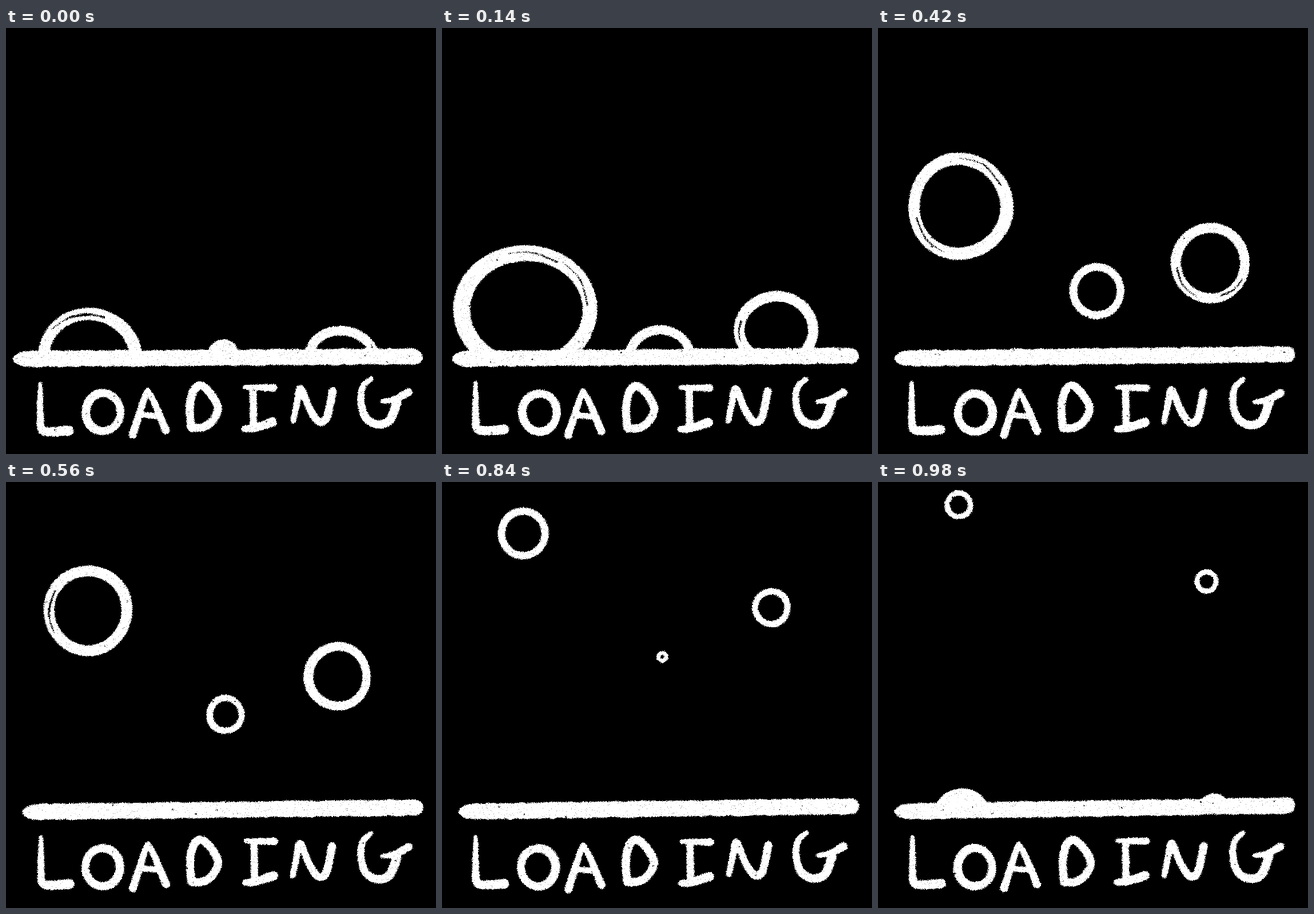
An HTML page with a canvas for the animation above (1120 ms loop, 752x745 px).

```html
<!DOCTYPE html>
<html lang="en">
<head>
<meta charset="utf-8">
<title>Loading</title>
<style>
  html, body { margin: 0; width: 100%; height: 100%; overflow: hidden; background: #000; }
  canvas { display: block; }
</style>
</head>
<body>
<canvas id="stage" width="752" height="745" role="img" aria-label="LOADING"></canvas>
<script>
const W = 752, H = 745, STEP = 140, POSES = 8, TAU = Math.PI * 2;
const stage = document.getElementById('stage').getContext('2d');
const layer = () => {
  const c = document.createElement('canvas');
  c.width = W;
  c.height = H;
  return c.getContext('2d', { willReadFrequently: true });
};
const ink = layer(), soft = layer();

let seed = 1;
function rand() {
  seed = (seed + 0x6D2B79F5) | 0;
  let t = Math.imul(seed ^ (seed >>> 15), 1 | seed);
  t = (t + Math.imul(t ^ (t >>> 7), 61 | t)) ^ t;
  return ((t ^ (t >>> 14)) >>> 0) / 4294967296;
}
const jitter = size => (rand() - 0.5) * 2 * size;
const lerp = (a, b, t) => a + (b - a) * t;

function erase(draw) {
  ink.globalCompositeOperation = 'destination-out';
  draw();
  ink.globalCompositeOperation = 'source-over';
}

function dot(x, y, r) {
  ink.beginPath();
  ink.arc(x, y, r, 0, TAU);
  ink.fill();
}

// Ellipse with a slight three-cornered bulge
function blob(x, y, rx, ry, bulge, turn) {
  ink.beginPath();
  for (let a = 0; a < TAU; a += 0.07) {
    const k = 1 + bulge * Math.cos(3 * (a - turn));
    ink.lineTo(x + rx * k * Math.cos(a), y + ry * k * Math.sin(a));
  }
  ink.fill();
}

function ring(x, y, rx, ry, line) {
  const bulge = rand() * 0.015, turn = rand() * 2;
  blob(x, y, rx, ry, bulge, turn);
  erase(() => blob(x + jitter(line / 12), y, rx - line, ry - line, bulge, turn));
}

// Smooth stroke through points, its width growing from w0 to w1
function brush(w0, w1, ...pts) {
  const at = i => pts[Math.max(0, Math.min(pts.length - 1, i))];
  const spline = (a, b, c, d, t) =>
    b + 0.5 * t * (c - a + t * (2 * a - 5 * b + 4 * c - d + t * (3 * (b - c) + d - a)));
  const last = pts.length - 1;
  for (let s = 0; s <= last * 24; s++) {
    const i = Math.min(last - 1, Math.floor(s / 24)), t = s / 24 - i;
    const [x, y] = [0, 1].map(k => spline(at(i - 1)[k], at(i)[k], at(i + 1)[k], at(i + 2)[k], t));
    dot(x, y, lerp(w0, w1, Math.sqrt(s / 24 / last)) / 2);
  }
}

const letters = [
  () => brush(4, 17, [60, 620], [60, 645], [60, 680], [63, 702], [82, 705], [110, 703]),
  () => ring(169.5, 673, 37.5, 40.5, 14.5),
  () => {
    brush(5, 14, [247, 632], [239, 655], [221, 711]);
    brush(5, 14, [247, 632], [260, 658], [279, 704]);
    brush(10, 10, [234, 676], [266, 679]);
  },
  () => brush(14, 14, [324, 698], [322, 662], [328, 635], [341, 625], [358, 639],
    [371, 664], [362, 686], [345, 698], [325, 699]),
  () => {
    brush(6, 13, [418, 628], [469, 629]);
    brush(12, 13, [433, 632], [434, 695]);
    brush(9, 16, [417, 701], [436, 699], [467, 689]);
  },
  () => brush(9, 14, [501, 688], [507, 660], [514, 631], [530, 667], [546, 689], [560, 681], [570, 636]),
  () => {
    brush(7, 16, [638, 614], [623, 629], [620, 655], [628, 682], [648, 694], [670, 687], [683, 655]);
    brush(5, 14, [657, 654], [680, 650], [703, 638]);
  }
];

function word() {
  for (const letter of letters) {
    ink.save();
    ink.translate(jitter(1.2), jitter(1.2));
    letter();
    ink.restore();
  }
}

// The bar tilts up a little through the loop while its left tip draws in
function bar(p) {
  const tip = Math.min(28, 11 + 6 * p), from = tip + 30, end = 730;
  const left = 579 - 0.4 * p, right = 574 - 1.2 * p, half = 14;
  const mid = x => lerp(left, right, (x - tip) / (end - tip));
  ink.beginPath();
  ink.moveTo(tip, left);
  ink.quadraticCurveTo(tip + 6, left - half, from, left - half);
  for (let x = from; x < end - half; x += 9) ink.lineTo(x, mid(x) - half + jitter(1));
  ink.bezierCurveTo(end + 4, right - half, end + 4, right + half, end - half, right + half);
  for (let x = end - half; x > from; x -= 9) ink.lineTo(x, mid(x) + half + jitter(1));
  ink.quadraticCurveTo(tip + 6, left + half, tip, left);
  ink.fill();
}

// A bubble swells out of the bar, rises and shrinks; keys are [age, y, radius]
const bubbles = [
  { x: 147, drift: -0.7, born: 7,
    keys: [[0, 579, 48], [1, 572, 91], [2, 493, 126], [4, 312, 92], [6, 147, 63], [8, 40, 25]] },
  { x: 380, drift: 0.9, born: 0,
    keys: [[0, 568, 26], [1, 576, 62], [2, 527, 68], [3, 460, 48], [5, 356, 21], [7, 256, 0]] },
  { x: 588, drift: -1.7, born: 7,
    keys: [[0, 567, 25], [1, 580, 66], [2, 527, 74], [4, 411, 69], [6, 271, 46], [8, 174, 21]] }
];

// Cubic through the keys, tangents taken from the neighbours
function sample(keys, age, k) {
  const last = keys.length - 1;
  const i = Math.max(0, Math.min(last - 1, keys.findIndex(key => key[0] >= age) - 1));
  const slope = j => {
    const a = keys[Math.max(0, j - 1)], b = keys[Math.min(last, j + 1)];
    return (b[k] - a[k]) / (b[0] - a[0]);
  };
  const a = keys[i], b = keys[i + 1], span = b[0] - a[0], t = (age - a[0]) / span;
  return lerp(a[k], b[k], t * t * (3 - 2 * t)) +
    span * t * (1 - t) * ((1 - t) * slope(i) - t * slope(i + 1));
}

// Gap between two loops of the chalk line
function slit(x, y, rx, ry) {
  const start = rand() * TAU, turn = 0.3 + rand() * 0.3;
  const pts = [0, 1, 2].map(i => {
    const a = start + i * turn, k = 1 - 0.03 * i;
    return [x + rx * k * Math.cos(a), y + ry * k * Math.sin(a)];
  });
  erase(() => brush(1, 3, ...pts));
}

function drawBubble({ x, drift, keys }, age) {
  const y = sample(keys, age, 1), r = sample(keys, age, 2);
  if (r < 4) return;
  const cx = x + drift * age;
  const ry = r * (age <= 2 ? 0.9 : 1.02);
  if (age === 0) {
    blob(cx, y, r, ry, 0, 0);
    return;
  }
  const line = 5 + 0.18 * r;
  ring(cx, y, r, ry, line);
  if (r > 65) {
    for (let i = 0; i < 2; i++) slit(cx, y, r - line * 0.35, ry - line * 0.35);
  }
}

// Chalk grain: ragged edges, small pits, faint specks
function grain() {
  erase(() => {
    for (let i = 0; i < 1400; i++) dot(rand() * W, rand() * H, 0.5 + rand() ** 3 * 1.2);
  });
  soft.clearRect(0, 0, W, H);
  soft.filter = 'blur(1px)';
  soft.drawImage(ink.canvas, 0, 0);
  const img = soft.getImageData(0, 0, W, H), d = img.data;
  for (let i = 0; i < d.length; i += 4) {
    const a = d[i + 3] / 255;
    let v = 0;
    if (a > 0.04) {
      v = a > 0.5 + jitter(0.35) ? 255 : 0;
      if (v && rand() < 0.025) v = 110 + rand() * 130;
    }
    d[i] = d[i + 1] = d[i + 2] = v;
    d[i + 3] = 255;
  }
  return img;
}

function render(p) {
  seed = 977 * (p + 1);
  ink.clearRect(0, 0, W, H);
  ink.save();
  ink.beginPath();
  ink.rect(0, 0, W, 572);
  ink.clip();
  for (const b of bubbles) {
    const end = b.keys[b.keys.length - 1][0];
    for (let age = (p - b.born + POSES) % POSES; age <= end; age += POSES) drawBubble(b, age);
  }
  ink.restore();
  bar(p);
  word();
  return grain();
}

const frames = Array.from({ length: POSES }, (_, p) => render(p));
let shown = -1;
function tick() {
  const i = Math.floor(performance.now() / STEP) % POSES;
  if (i !== shown) stage.putImageData(frames[shown = i], 0, 0);
  requestAnimationFrame(tick);
}
tick();
</script>
</body>
</html>
```
